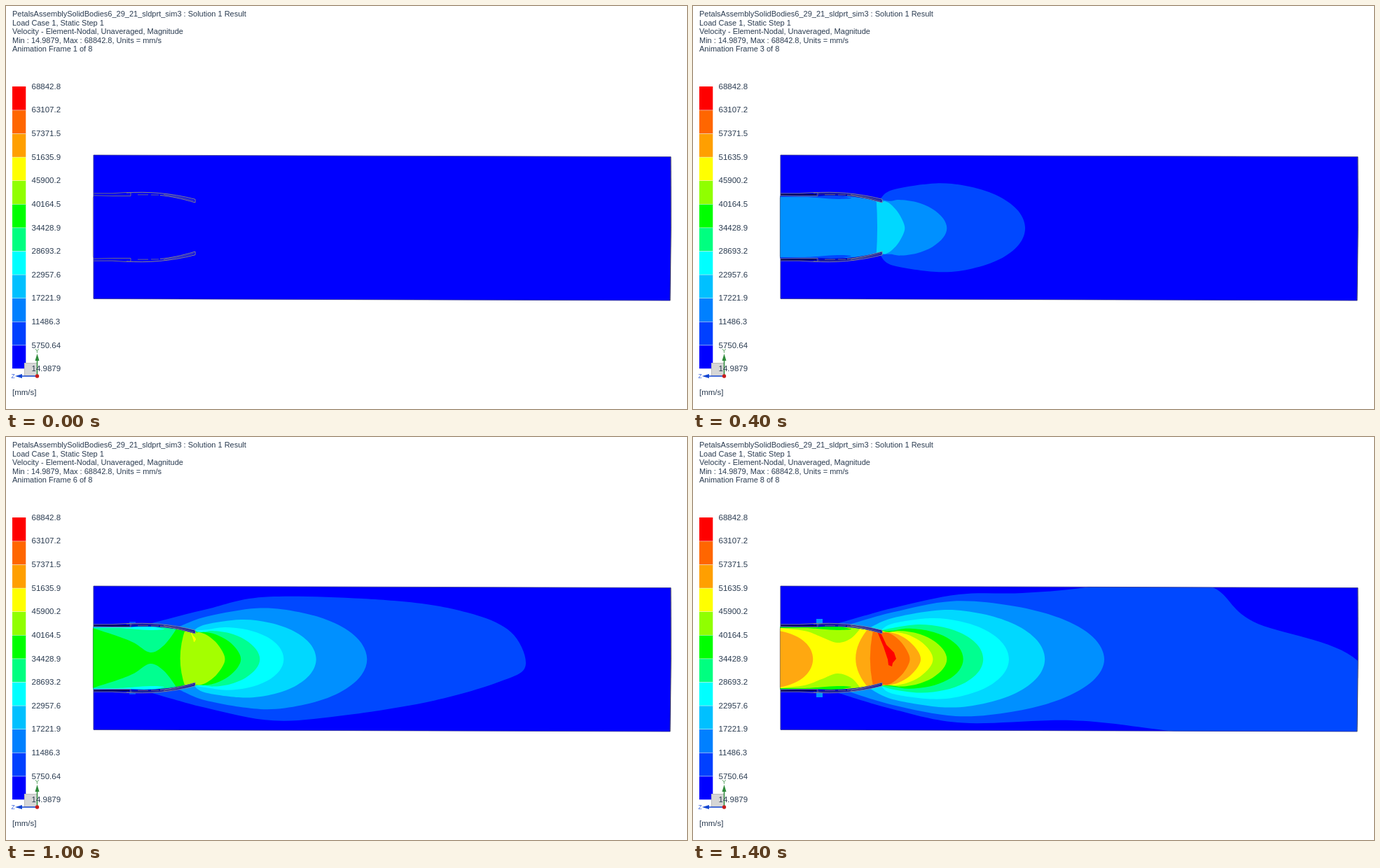
An HTML page that plays this animation: 972x576 px, repeating every 1600 ms.

```html
<!DOCTYPE html>
<html lang="en">
<head>
<meta charset="utf-8">
<title>Velocity result</title>
<style>
html, body { margin: 0; width: 100%; height: 100%; overflow: hidden; background: #fff; }
svg { display: block; width: 972px; height: 576px; }
text { font-family: "Liberation Sans", Arial, sans-serif; fill: #2a3b50; white-space: pre; }
</style>
</head>
<body>
<svg id="stage" viewBox="0 0 972 576"></svg>
<script>
const NS = "http://www.w3.org/2000/svg";
const stage = document.getElementById("stage");
const STEPS = 8, STEP_MS = 200, LEVELS = 12;
const MIN = 14.9879, MAX = 68842.806;
const AXIS = 316.8, NOZZLE = 268;

const legend = ["#0000ff", "#0040ff", "#0080ff", "#00c0ff", "#00ffff", "#00ff80",
  "#00ff00", "#90ff00", "#ffff00", "#ff9f00", "#ff6600", "#ff0000"];
const bands = ["#0000ff", "#0048ff", "#0090ff", "#00d8ff", "#00ffff", "#00ff90",
  "#00ff00", "#a4ff00", "#ffff00", "#ffa810", "#ff6c00", "#ff0000"];

function add(parent, tag, attrs, text) {
  const el = document.createElementNS(NS, tag);
  for (const k in attrs) el.setAttribute(k, attrs[k]);
  if (text !== undefined) el.textContent = text;
  parent.appendChild(el);
  return el;
}
const fill = (parent, d, color) => add(parent, "path", { d, fill: color });
const line = (parent, d, color, w = 1) =>
  add(parent, "path", { d, fill: "none", stroke: color, "stroke-width": w });
const label = (parent, x, y, size, text) => add(parent, "text", { x, y, "font-size": size }, text);
const flip = ([x, y]) => [x, 632 - y];

// Smooth curve through a list of points
function smooth(p) {
  let d = "M" + p[0];
  for (let i = 0; i < p.length - 1; i++) {
    const a = p[i - 1] || p[i], b = p[i], c = p[i + 1], e = p[i + 2] || c;
    const c1 = [b[0] + (c[0] - a[0]) / 6, b[1] + (c[1] - a[1]) / 6];
    const c2 = [c[0] - (e[0] - b[0]) / 6, c[1] - (e[1] - b[1]) / 6];
    d += "C" + [c1, c2, c].join(" ");
  }
  return d;
}

// Contour v of the jet behind the nozzle: a skewed superellipse with shoulders
function jet(v) {
  const bell = w => Math.exp(-((v / w) ** 2));
  const skew = Math.exp(5.6 * (1.4 - v));
  const height = 37.5 + 58 * bell(3.9);
  const tip = [176 + 593 / Math.sqrt(v) - 5.4 * v + 72 * skew, 317.5 + 9 * skew];
  const root = Math.min(NOZZLE, Math.max(204, 162 + 30 * v));
  const rootY = 267 + 10 * (Math.max(0, root - 195) / 75) ** 2;

  const half = s => {
    const peak = [NOZZLE + 3 + 112 * bell(5.6) + (s < 0 ? 6 * bell(5.6) : 0), AXIS - s * height];
    const base = [root, rootY];
    const shoulder = [Math.min(285, (root + peak[0]) / 2), AXIS - s * height * (1 - 0.22 * bell(5.6))];
    const pts = [s > 0 ? base : flip(base), shoulder, peak];
    if (v < 1.3) return pts;
    const pow = 1 + 0.08 * Math.max(0, v - 6) + (s < 0 ? 0.3 : -0.25) * skew;
    for (let a = 1; a < 4; a++) {
      const q = a * Math.PI / 8;
      pts.push([peak[0] + (tip[0] - peak[0]) * Math.sin(q) ** pow,
        tip[1] + (peak[1] - tip[1]) * Math.cos(q) ** pow]);
    }
    return pts;
  };
  const end = v < 1.3 ? flood((v - 1) * 6) : [tip];
  return smooth([...half(1), ...end, ...half(-1).reverse()]) + "Z";
}

// Slowest contours reach the walls and leave the box
const flood = f => [
  [470, 223 + 5 * f], [560 + 50 * f, 215], [650, 195], [742 - 54 * f, 215],
  [800, 264 + 32 * f], [949, 320 + 59 * f], [1000, 450], [900, 450],
  [675 + 173 * f, 419.5], [540 + 60 * f, 405 - 11 * f]
];

// Contour v between the petals
function core(v) {
  if (v < 7) return "M123 268H271V364H123Z";
  if (v < 8.6) {
    const u = (v - 7) / 1.4;
    const depth = 4 + 32 * u ** 1.7;
    const edge = [[123, 273], [160, 273 + 12 * u ** 3], [183, 272 + 0.62 * depth],
      [206, 272 + depth], [226, 272 + 0.7 * depth], [214 + 31 * Math.sqrt(u), 272]];
    const low = smooth(edge.map(flip).reverse()).slice(1);
    return smooth(edge) + "L271 272V360L" + low + "Z";
  }
  const w = v - 8.75;
  const tip = 182 - 43 * w, x = 124 + 0.68 * (tip - 124);
  const edge = 250 + 6.5 * w, mid = 227 + 20.6 * w;
  const inlet = v < 9.6
    ? `M123 277C${x} 283 ${tip} 300 ${tip} 317C${tip} 335 ${x} 352 123 358Z` : "";
  return inlet + `M271 272H${edge}Q${2 * mid - edge} 317 ${edge} 360H271Z`;
}

// Fastest spot at the upper petal tip, shrinking as v grows
function hotSpot(parent, v, color) {
  const k = Math.max(0.15, 1 - 3.5 * (v - 11));
  fill(parent, "M0 0L6 4 13 19 24 30 27 39 22 45 21 50 16 48 15 40 9 22Z", color)
    .setAttribute("transform", `translate(263 278) scale(${k})`);
}

const defs = add(stage, "defs", {});
const clip = (id, d) => fill(add(defs, "clipPath", { id }), d, "#000");
const box = "M124.7 213L949 215.5Q950 318 948 421L124.7 418.5Z";
clip("box", box);
clip("duct", "M124 271.5H178C210 270 240 272 270 281V351C240 360 210 362 178 360.5H124Z");

function drawStep(step) {
  const g = add(stage, "g", { visibility: "hidden" });
  fill(g, box, bands[0]);
  const outer = add(g, "g", { "clip-path": "url(#box)" });
  const inner = add(g, "g", { "clip-path": "url(#duct)" });
  // Speed grows linearly, so each level picks the full-load contour level / load
  for (let i = 1; i < LEVELS; i++) {
    const v = i * (STEPS - 1) / step;
    if (v >= LEVELS) break;
    if (v > 10.6) { hotSpot(g, v, bands[i]); continue; }
    fill(outer, jet(v), bands[i]);
    fill(inner, core(v), bands[i]);
  }
  for (const flipped of [false, true]) {
    drawPetal(add(g, "g", flipped ? { transform: "matrix(1 0 0 -1 0 632)" } : {}), step);
  }
  line(g, "M125 213L949 215.5M125 418.5L948 421", "#30307a", 0.7);
  line(g, "M949 215.5Q950 318 948 421", "#55555c");
  line(g, "M125 213V272L124.3 274V358L125 360V418", "#55556a", 0.6);
  label(g, 9, 65.4, 11, `Animation Frame ${step + 1} of 8`);
  return g;
}

function drawPetal(g, step) {
  if (step > 3) {
    const h = 2 * (step - 2);
    fill(g, `M176 270V${270 - h}H185V270Z`, bands[step > 5 ? 2 : 1]);
  }
  if (step) {
    fill(g, "M125 268H172C200 265 235 267 270 276.5V281C240 272.5 215 270 178 271.5H125Z", "#0000c8");
    line(g, "M125 269.5H176", "#00003c", 1.5);
    line(g, "M178 268.5C210 267.5 240 270.5 269 278.5", "#3c3c70", 0.9);
  }
  line(g, "M125 267.8H152L170 266.5H178V271.5H152L125 270.8", "#77777c", 0.9);
  line(g, "M172 267C200 265 235 267 270 276.3V281C250 275 235 272 220 270.5", "#85858a");
  line(g, "M188 269.8H203M207 270H218M225 269.5C240 271.5 255 274.5 268 278.5", "#77777c", 0.8);
}

// Legend
const cell = 33.6;
legend.forEach((c, i) => {
  const y = 115 + cell * (LEVELS - 1 - i);
  add(stage, "rect", { x: 9, y, width: 19.3, height: cell, fill: c });
  if (i < LEVELS - 1) line(stage, `M9 ${y}h19.3`, "#e8f0f0", 1.2);
});

// Axis marker
add(stage, "rect", { x: 26.5, y: 510.5, width: 18, height: 18, fill: "#d6d6d6", stroke: "#bcbcbc" });
line(stage, "M44.5 528V506", "#2e8b3a", 1.5);
fill(stage, "M44.5 497L47.5 507H41.5Z", "#2e8b3a");
line(stage, "M44 529H22", "#1446d2", 1.5);
fill(stage, "M13 529L23 526V532Z", "#1446d2");
add(stage, "circle", { cx: 44.5, cy: 529, r: 2.7, fill: "#c81e1e" });
label(stage, 41.6, 496, 8.5, "Y").style.fill = "#4a9a55";
label(stage, 7.5, 532, 8.5, "Z").style.fill = "#3c64dc";

for (let i = 0; i <= LEVELS; i++) {
  const value = MIN + (MAX - MIN) * i / LEVELS;
  label(stage, 36.5, 118.6 + 33.65 * (LEVELS - i), 11.5, value.toPrecision(6));
}
["PetalsAssemblySolidBodies6_29_21_sldprt_sim3 : Solution 1 Result",
  "Load Case 1, Static Step 1",
  "Velocity - Element-Nodal, Unaveraged, Magnitude",
  "Min : 14.9879, Max : 68842.8, Units = mm/s"
].forEach((s, i) => label(stage, 9, 15 + 12.6 * i, 11, s));
label(stage, 9, 556, 11.5, "[mm/s]");

const views = Array.from({ length: STEPS }, (_, i) => drawStep(i));
const start = performance.now();
let shown = -1;
function tick() {
  const now = Math.floor(Math.max(0, performance.now() - start) / STEP_MS) % STEPS;
  if (now !== shown) {
    views.forEach((g, i) => g.setAttribute("visibility", i === now ? "visible" : "hidden"));
    shown = now;
  }
  requestAnimationFrame(tick);
}
tick();
</script>
</body>
</html>
```
